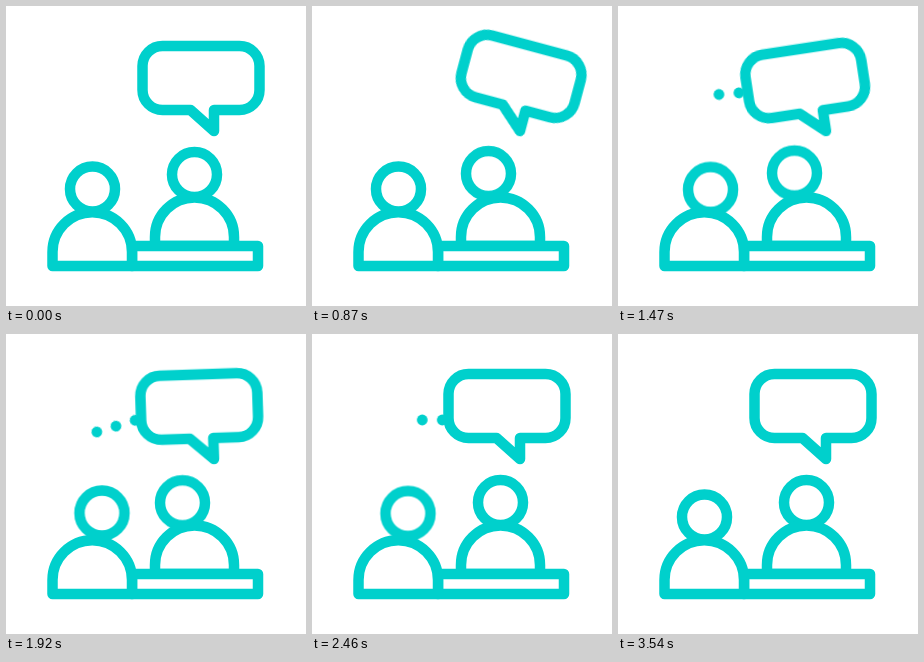
An HTML page without scripts for the animation above (3600 ms loop, 300 by 300 pixels).

```html
<!DOCTYPE html>
<html lang="en">
<head>
<meta charset="utf-8">
<title>Conversation</title>
<style>
  html, body { margin: 0; width: 100%; height: 100%; overflow: hidden; background: #fff; }
  svg { display: block; width: 100%; height: 100%; }

  .line { fill: #fff; stroke: #00d0cc; stroke-width: 10.5; stroke-linejoin: round; stroke-linecap: round; }
  .dots { fill: #00d0cc; }

  .bubble, .dots, .left, .right { animation: 3600ms linear infinite; }
  .bubble { animation-name: sway; transform-origin: 208px 125px; }
  .dots { animation-name: reply; transform-origin: 135px 163px; }
  .left { animation-name: lean-right; }
  .right { animation-name: lean-left; }

  @keyframes sway {
    0%, 9.17% { transform: rotate(0deg); }
    24.17%, 25.83% { transform: rotate(15deg); }
    44.9% { transform: rotate(-15deg); }
    54.6%, 100% { transform: rotate(0deg); }
  }

  @keyframes lean-left {
    0%, 9.17% { transform: translate(0, 0); }
    15.83% { transform: translate(-8px, 0); }
    19.17% { transform: translate(-12px, 0); }
    32.5% { transform: translate(-12px, -2.5px); }
    40.83% { transform: translate(-12px, -1.5px); }
    53.33%, 55% { transform: translate(-12px, .3px); }
    65%, 100% { transform: translate(0, 0); }
  }

  @keyframes lean-right {
    0%, 35.83% { transform: translate(0, 0); }
    40.83% { transform: translate(6px, .5px); }
    44.72% { transform: translate(9.5px, 0); }
    53.33% { transform: translate(9.5px, -4px); }
    68.33%, 81.4% { transform: translate(9.5px, -3.5px); }
    90.3%, 100% { transform: translate(0, 0); }
  }

  @keyframes reply {
    0%, 35.82% { visibility: hidden; transform: translate(0, 0) rotate(0deg); }
    35.83% { visibility: visible; transform: translate(0, 0) rotate(0deg); }
    40.83% { transform: translate(5.2px, -3.4px) rotate(-4.5deg); }
    53.33% { transform: translate(9.5px, -4px) rotate(-17deg); }
    68.33% { transform: translate(8.7px, -3px) rotate(0deg); }
    79.2% { transform: translate(9.5px, -3.5px) rotate(17deg); }
    92.5%, 98.32% { visibility: visible; transform: translate(0, 0) rotate(0deg); }
    98.33%, 100% { visibility: hidden; transform: translate(0, 0) rotate(0deg); }
  }
</style>
</head>
<body>
<svg viewBox="0 0 300 300">
  <g class="dots">
    <circle cx="101.5" cy="89" r="5.4"/>
    <circle cx="121.5" cy="89" r="5.4"/>
    <circle cx="141.5" cy="89" r="5.4"/>
  </g>

  <path class="line bubble" d="M156.5 40H233.5a20 20 0 0 1 20 20V84a20 20 0 0 1-20 20H208V125L184.5 104H156.5a20 20 0 0 1-20-20V60a20 20 0 0 1 20-20Z"/>

  <circle class="line right" cx="188.5" cy="168.5" r="22.5"/>
  <path class="line" d="M149 240V231a39.5 39.5 0 0 1 79 0V240Z"/>
  <path class="line" d="M126 240H252V260H126Z"/>

  <circle class="line left" cx="86.5" cy="183" r="22.5"/>
  <path class="line" d="M46.5 260V246a39.75 39.75 0 0 1 79.5 0V260Z"/>
</svg>
</body>
</html>
```
